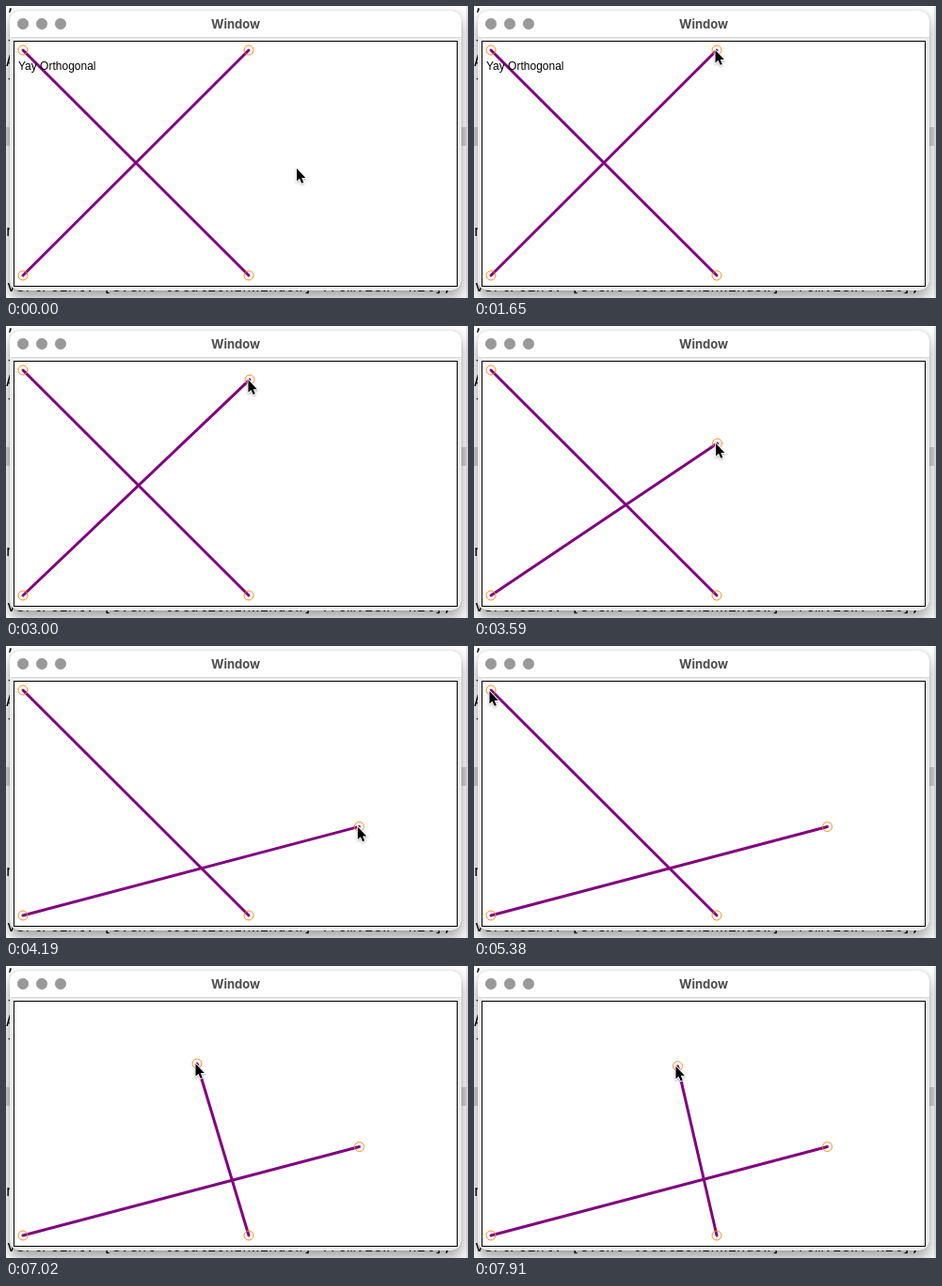
Animation of 491x311 px, one loop 8000 ms. Source, as an HTML page:

```html
<!DOCTYPE html>
<html lang="en">
<head>
<meta charset="utf-8">
<title>Orthogonal lines</title>
<style>
  html, body { margin: 0; width: 100%; height: 100%; overflow: hidden; background: #fff; }
  #stage { position: relative; width: 491px; height: 311px; overflow: hidden; }
  #stage > * { position: absolute; }
  .code { font: 15.4px/18px "DejaVu Sans Mono", monospace; color: #000; white-space: pre; left: 1px; }
  .bar { left: 0; top: 129px; width: 489px; height: 20px; background: #d4d4d4; }
  .edge { left: 489px; top: 0; width: 2px; height: 311px; background: #e4e4e4; }
  .window {
    left: 4px; top: 5px; width: 480px; height: 298px; border-radius: 10px;
    background: #ececec; overflow: hidden;
    box-shadow: 0 0 1px rgba(0,0,0,.45), 0 8px 16px rgba(0,0,0,.38);
  }
  .title {
    height: 28px; background: #fff; border-bottom: 1px solid #dcdcdc;
    font: 700 13px/28px Inter, sans-serif; color: #4d4d4d; text-align: center;
  }
  svg { left: 0; top: 0; }
  #label { font: 12px "Liberation Sans", Arial, sans-serif; }
  .lines { stroke: #800080; stroke-width: 3; stroke-linecap: round; }
  .nodes { fill: none; stroke: #ff8c1a; }
</style>
</head>
<body>
<div id="stage">
  <div class="bar"></div>
  <div class="edge"></div>
  <div class="code" style="top:-9px;left:0">,</div>
  <div class="code" style="top:27px;left:0">-</div>
  <div class="code" style="top:50px;left:0">A</div>
  <div class="code" style="top:68px;left:0">-</div>
  <div class="code" style="top:231px;left:0">n</div>
  <div class="code" style="top:290px">vertPoint: [event locationInWindow] fromView: nil];</div>
  <div class="window"><div class="title">Window</div></div>
  <svg width="491" height="311" viewBox="0 0 491 311">
    <g fill="#999" stroke="#8c8c8c" stroke-width=".6">
      <circle cx="18" cy="19" r="5.7"/><circle cx="38" cy="19" r="5.7"/><circle cx="58" cy="19" r="5.7"/>
    </g>
    <rect x="8.5" y="37.5" width="471" height="261" fill="#fff" stroke="#000"/>
    <g class="lines"><line id="falling"/><line id="rising"/></g>
    <g class="nodes" id="nodes"><circle r="5"/><circle r="5"/><circle r="5"/><circle r="5"/></g>
    <text id="label" x="13" y="68">Yay Orthogonal</text>
    <g id="cursor">
      <path id="arrow" d="M0 0V13.5L3 10.8L5.2 15.8L7.3 14.9L5.2 10H9.3Z"
            stroke="#fff" stroke-width="1.8" paint-order="stroke"
            style="filter:drop-shadow(0 1px 1px rgba(0,0,0,.3))"/>
    </g>
  </svg>
</div>
<script>
const LOOP = 8000;
const corners = {
  topLeft: { x: 18, y: 47 }, bottomRight: { x: 258, y: 287 },
  topRight: { x: 258, y: 47 }, bottomLeft: { x: 18, y: 287 }
};
const start = { x: 310.5, y: 173 };
const at = (x, y) => ({ x, y });

// Each move starts where the last one ended and advances in evenly timed steps.
const moves = [
  { from: 300, to: 1200, steps: 7, end: at(260, 47), bend: at(207, 72), ease: 1.5 },
  { from: 1350, end: at(260.5, 47) },
  { from: 1650, end: at(258, 47) },
  { from: 2100, to: 3140, steps: 8, end: at(259, 46), bend: at(259, 97), drag: "topRight" },
  { from: 3440, to: 3590, steps: 2, end: at(258.6, 125), drag: "topRight" },
  { from: 3740, to: 4340, steps: 5, end: at(375.5, 192.5), ease: 4, drag: "topRight" },
  { from: 4490, to: 4790, steps: 3, end: at(32, 49) },
  { from: 5090, to: 5380, steps: 3, end: at(18, 48), ease: 2 },
  { from: 5680, to: 6420, steps: 6, end: at(202.8, 124), ease: 2, drag: "topLeft" },
  { from: 6570, to: 7020, steps: 4, end: at(203, 104), drag: "topLeft" },
  { from: 7320, end: at(216.5, 106.7), drag: "topLeft" },
  { from: 7910, end: at(216, 106.7) }
];

const byId = id => document.getElementById(id);
const setAll = (el, attrs) => Object.entries(attrs).forEach(([k, v]) => el.setAttribute(k, v));
const setLine = (id, a, b) => setAll(byId(id), { x1: a.x, y1: a.y, x2: b.x, y2: b.y });
const mix = (a, b, p) => at(a.x + (b.x - a.x) * p, a.y + (b.y - a.y) * p);

function progress({ from, to, steps = 1, ease = 1 }, time) {
  if (steps === 1) return 1;
  const interval = (to - from) / (steps - 1);
  const done = Math.min(steps, Math.floor((time - from + 5) / interval) + 1);
  return 1 - (1 - done / steps) ** ease;
}

function sceneAt(time) {
  const scene = { pointer: start, ...corners };
  for (const move of moves) {
    if (move.from > time) break;
    const origin = scene[move.drag] || scene.pointer;
    const { end, bend = mix(origin, end, .5) } = move;
    const p = progress(move, time);
    scene.pointer = mix(mix(origin, bend, p), mix(bend, end, p), p);
    if (move.drag) scene[move.drag] = scene.pointer;
  }
  return scene;
}

function isOrthogonal(a, b, c, d) {
  const u = at(b.x - a.x, b.y - a.y), v = at(d.x - c.x, d.y - c.y);
  const cosine = (u.x * v.x + u.y * v.y) / (Math.hypot(u.x, u.y) * Math.hypot(v.x, v.y));
  return Math.abs(cosine) < .001;
}

function draw(time) {
  const { pointer, topLeft, bottomRight, topRight, bottomLeft } = sceneAt(time);
  const ends = [topLeft, bottomRight, bottomLeft, topRight];
  setLine("falling", topLeft, bottomRight);
  setLine("rising", bottomLeft, topRight);
  ends.forEach((p, i) => setAll(byId("nodes").children[i], { cx: p.x, cy: p.y }));
  byId("label").setAttribute("visibility", isOrthogonal(...ends) ? "visible" : "hidden");
  byId("cursor").setAttribute("transform", `translate(${pointer.x - 1.5} ${pointer.y})`);
}

const began = performance.now();
function tick() {
  draw((performance.now() - began) % LOOP);
  requestAnimationFrame(tick);
}
tick();
</script>
</body>
</html>
```
